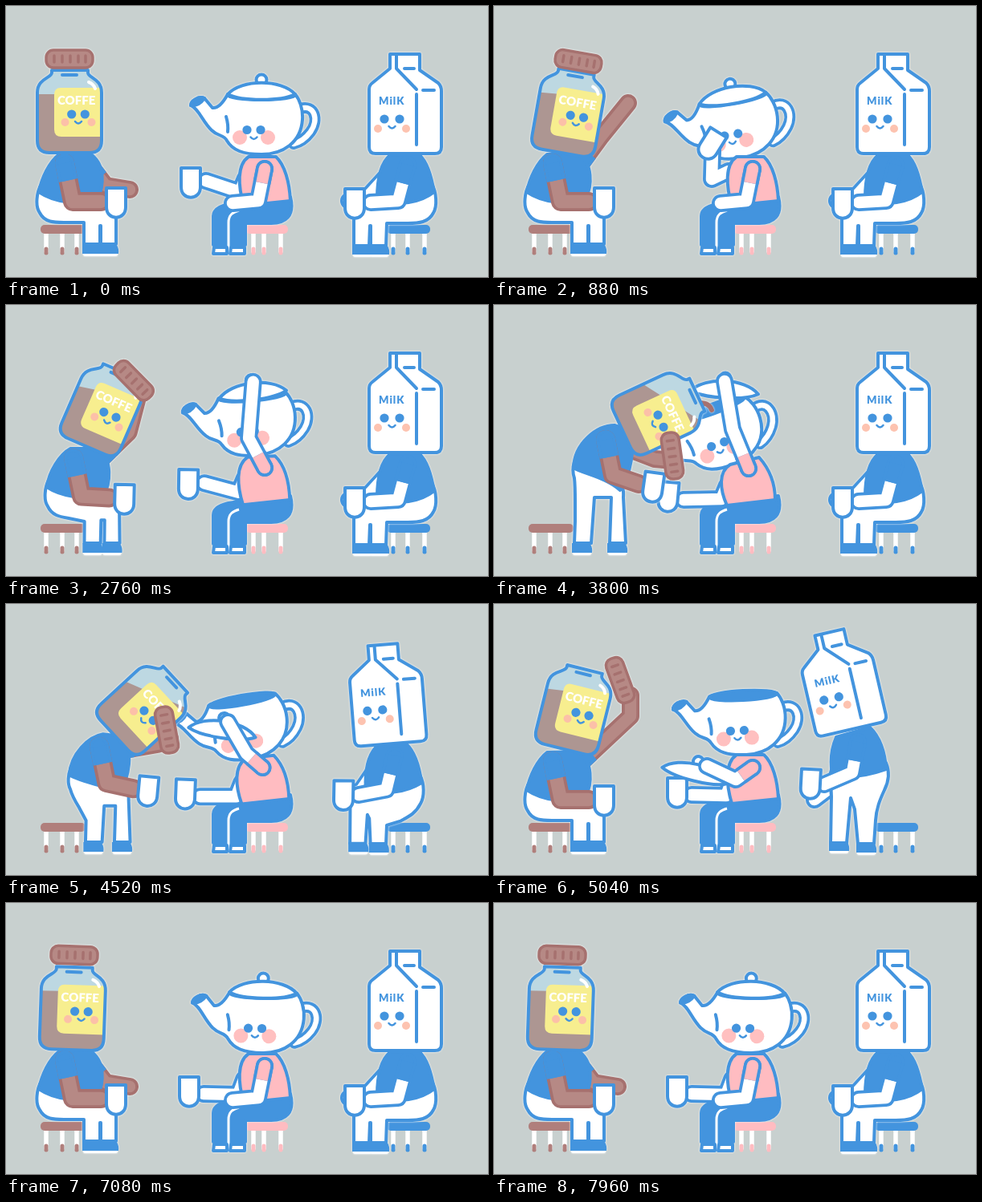
Animation, 600 px wide and 338 px high, one loop 8000 ms. Source, as an HTML page:

```html
<!DOCTYPE html>
<html lang="en">
<head>
<meta charset="utf-8">
<title>Coffee, tea and milk</title>
<style>
  html, body { margin: 0; width: 100%; height: 100%; overflow: hidden; background: #c8d0cf; }
  svg { display: block; width: 100vw; height: 100vh; }
  .friend { filter: drop-shadow(0 0 .8px #fff); }
  .line { stroke: #4394de; stroke-width: 4; stroke-linecap: round; stroke-linejoin: round; }
  .white { fill: #fff; }
  .blue { fill: #4394de; }
  .none { fill: none; }
  .pink { fill: #ffbcc1; }
  .brown { fill: #b68985; stroke: #a6716f; stroke-width: 3.5; stroke-linecap: round; }
  text { font: 900 15px Lato, "Open Sans", sans-serif; }
</style>
</head>
<body>
<svg viewBox="0 0 600 338">
  <defs>
    <path id="cup" class="line white" d="M-12 -18 H12 V6 C12 23 -12 23 -12 6 Z"/>
    <g id="shoe">
      <rect x="-11" y="9" width="23" height="5" rx="2.5" fill="#fff"/>
      <path class="blue" d="M-12 -1 H10 Q14 4 13 11 H-12 Z"/>
    </g>
    <path id="jarShape" d="M57 80 V83 C57 90 39 90 39 108 V168 Q39 183 54 183 H104 Q119 183 119 168 V108 C119 90 102 90 102 83 V80 Z"/>
    <clipPath id="jarClip"><use href="#jarShape"/></clipPath>
  </defs>
  <g id="stools"></g>

  <g class="friend" id="tea">
    <path class="line blue" d="M354 238 C360 262 348 271 330 271 L298 271 V298 H258 V262 C258 248 280 246 300 244 Z"/>
    <path class="none" stroke="#fff" stroke-width="3" d="M277 301 V270 C277 260 283 257 290 255"/>
    <path class="line white" stroke-width="3" d="M259 301 H275 V309 H258 Z M280 301 H297 V309 H279 Z"/>
    <g id="pot">
      <g fill="none" stroke-linecap="round">
        <path id="handle" stroke="#4394de" stroke-width="14" d="M366 128 C384 122 390 142 379 157 C373 165 366 170 358 172"/>
        <path stroke="#fff" stroke-width="6.5" d="M366 128 C384 122 390 142 379 157 C373 165 366 170 358 172"/>
      </g>
      <path class="line white" d="M276 110 C270 121 264 128 257 127 L247 115 C240 112 230 118 230 124 C240 128 245 145 256 155 C264 163 271 160 275 168 C282 180 295 185 318 185 C345 185 367 170 369 142 C370 128 365 116 360 110 C340 105 296 105 276 110 Z"/>
      <path class="line blue" d="M247 115 C240 112 230 118 230 124 Q240 125 247 115 Z"/>
      <path class="line none" d="M274 138 Q277 148 276 157"/>
      <ellipse class="line blue" cx="318" cy="111" rx="42" ry="6"/>
      <g id="teaFace"></g>
    </g>
    <g id="teaFar"></g>
    <use id="teaCup" href="#cup"/>
    <path id="teaShirt" class="line pink"/>
    <g id="teaLid">
      <circle class="line white" cy="-18" r="6.5"/>
      <path class="line white" d="M-42 0 C-25 -19 25 -19 42 0 C25 9 -25 9 -42 0 Z"/>
    </g>
    <g id="teaNear"></g>
  </g>

  <g class="friend" id="milk">
    <g id="milkFar"></g>
    <path id="milkPants" class="line white"/>
    <use id="milkShoeA" href="#shoe"/><use id="milkShoeB" href="#shoe"/>
    <path id="milkShirt" class="line blue"/>
    <path id="milkStream" fill="none" stroke="#fff" stroke-width="6" stroke-linecap="round" d="M320 92 Q313 98 313 114"/>
    <g id="carton">
      <path class="line white" d="M478 60 H515 V80 L538 96 Q542 100 542 106 V176 Q542 184 534 184 H460 Q452 184 452 176 V104 Q452 99 456 96 L478 78 Z"/>
      <path class="line none" d="M486 62 V78 L511 104 M511 110 V173 M496 78 H508 M519 105 H533"/>
      <text class="blue" x="464" y="123" style="font-size:13px" letter-spacing="1">MilK</text>
      <g id="milkFace"></g>
    </g>
    <g id="milkNear"></g>
    <use id="milkCup" href="#cup"/>
  </g>

  <g class="friend" id="coffee">
    <g id="coffeeFar"></g>
    <path id="coffeePants" class="line white"/>
    <use id="coffeeShoeA" href="#shoe"/><use id="coffeeShoeB" href="#shoe"/>
    <path id="coffeeShirt" class="line blue"/>
    <g id="coffeeNear"></g>
    <path id="coffeeStream" fill="none" stroke="#a6716f" stroke-width="6" stroke-linecap="round" d="M256 122 Q268 122 271 131"/>
    <g id="jar">
      <use href="#jarShape" fill="#bdd8e2"/>
      <g clip-path="url(#jarClip)">
        <rect id="liquid" x="-40" y="110" width="240" height="200" fill="#ad9692"/>
        <path fill="#f7ee8f" d="M120 102 H68 Q60 102 60 111 V154 Q60 163 69 163 H120 Z"/>
      </g>
      <use href="#jarShape" class="line none"/>
      <path class="line none" d="M70 86 H88"/>
      <path d="M103 95 Q109 97 111 103" fill="none" stroke="#fff" stroke-width="4" stroke-linecap="round"/>
      <text x="64" y="123" fill="#fff">COFFE</text>
      <g id="coffeeFace"></g>
    </g>
    <use id="coffeeCup" href="#cup"/>
    <g id="coffeeLid" class="brown">
      <rect x="-29" y="-11" width="58" height="22" rx="9"/>
      <path d="M-19 -4 V4 M-9 -4 V4 M1 -4 V4 M11 -4 V4 M20 -4 V4"/>
    </g>
  </g>
</svg>
<script>
const LOOP = 8000, BLUE = '#4394de', PINK = '#ffbcc1', BROWN = '#b68985';
const NUMBER = /-?\d*\.?\d+/g;
const $ = id => document.getElementById(id);
const tracks = [];

function add(parent, tag, attrs) {
  const el = document.createElementNS('http://www.w3.org/2000/svg', tag);
  for (const name in attrs) el.setAttribute(name, attrs[name]);
  return parent.appendChild(el);
}

// keys maps a time to a string; the numbers inside are eased between keys.
function drive(apply, keys) {
  tracks.push({ apply, steps: Object.entries(keys).map(([t, s]) => [+t, s, s.match(NUMBER).map(Number)]) });
}
const track = (id, attr, keys) => drive(s => $(id).setAttribute(attr, s), keys);

// Two-bone limb given as shoulder, elbow, hand.
function limb(id, { skin = '#fff', edge = BLUE, sleeve = BLUE, len = 0, w = 22 }, keys) {
  const layer = (stroke, width, dashed) => add($(id), 'path', {
    fill: 'none', stroke, 'stroke-width': width, 'stroke-linejoin': 'round',
    ...(dashed ? { 'stroke-dasharray': `${len} 999` } : { 'stroke-linecap': 'round' })
  });
  const inner = w - 7.5;
  const full = [layer(edge, w), layer(skin, inner)], caps = [];
  if (len) for (const [color, width] of [[BLUE, w], [sleeve, inner]]) {
    caps.push(layer(color, width));
    full.push(layer(color, width, true));
  }
  drive(s => {
    const [x, y] = s.split(' ');
    full.forEach(p => p.setAttribute('d', 'M' + s));
    caps.forEach(p => p.setAttribute('d', `M${x} ${y} h.01`));
  }, keys);
}

function face(id, x, y, eyeGap, cheekGap, cheekY, cheekR, cheek) {
  for (const side of [-1, 1]) {
    add($(id), 'circle', { cx: x + side * cheekGap, cy: cheekY, r: cheekR, fill: cheek });
    add($(id), 'circle', { cx: x + side * eyeGap, cy: y, r: 5.6, fill: BLUE });
  }
  add($(id), 'path', { d: `M${x - 4} ${y + 9} q4 5 8 0`, class: 'line none', style: 'stroke-width:2.5' });
}

function stool(x, width, color, legs) {
  for (const leg of legs) {
    add($('stools'), 'path', { d: `M${leg} 282 V306`, stroke: '#fff', 'stroke-width': 5.5, 'stroke-linecap': 'round' });
    add($('stools'), 'path', { d: `M${leg} 303 V308`, stroke: color, 'stroke-width': 5, 'stroke-linecap': 'round' });
  }
  add($('stools'), 'rect', { x, y: 273, width, height: 11, rx: 5, fill: color });
}

stool(43, 56, '#b07f7c', [50, 70, 88]);
stool(298, 53, PINK, [308, 321, 342]);
stool(474, 54, BLUE, [482, 500, 521]);
face('coffeeFace', 90, 135, 8.3, 16.5, 145, 5, '#fcc0a8');
face('teaFace', 308.5, 154.5, 8.5, 17.5, 164, 9, '#ffc0c0');
face('milkFace', 480.5, 141, 9.5, 17.5, 153, 5, '#fdc3b0');

// Coffee jar: opens up, stands to pour, sits and closes again.
const stand = (seated, standing) => ({ 0: seated, 2560: seated, 3250: standing, 4250: standing, 4900: seated, 8000: seated });
track('coffeePants', 'd', stand(
  'M44 222 C38 232 36 250 42 258 C48 270 60 270 72 270 L97 270 L97 297 L117 297 L117 274 L118 274 L118 297 L137 297 L137 252 C137 240 125 236 112 236 Z',
  'M100 196 C98 202 98 210 100 216 C101 225 101 235 101 245 L101 270 L100 297 L121 297 L125 240 L146 240 L144 297 L164 297 L161 240 C162 225 158 222 150 215 Z'));
track('coffeeShirt', 'd', stand(
  'M66 185 C54 194 44 215 41 232 C60 245 95 250 114 240 C122 225 124 196 104 184 Z',
  'M150 150 C128 150 100 172 99 203 C110 210 140 215 157 231 C168 215 180 175 165 155 Z'));
track('coffeeShoeA', 'transform', stand('translate(107 298)', 'translate(109 298)'));
track('coffeeShoeB', 'transform', stand('translate(127 298)', 'translate(153 298)'));
track('coffeeCup', 'transform', stand('translate(137 245) rotate(0)', 'translate(198 227) rotate(8)'));
limb('coffeeNear', { skin: BROWN, edge: '#a6716f', len: 22, w: 24 },
  stand('73 196 83 244 118 244', '139 168 148 212 180 223'));
limb('coffeeFar', { skin: BROWN, edge: '#a6716f', len: 20 }, {
  0: '104 198 124 224 154 229', 300: '104 198 124 224 154 229', 880: '106 200 133 163 167 121',
  1200: '106 200 148 150 138 82', 1600: '106 200 148 150 136 78', 2080: '106 200 143 152 155 88',
  2560: '106 200 143 152 155 88', 3250: '156 175 200 192 222 194', 4250: '156 175 200 192 222 194',
  4900: '106 200 170 142 170 118', 5040: '106 200 170 140 170 114', 5500: '106 200 160 150 138 82',
  6000: '106 200 160 150 138 82', 6360: '106 200 151 160 156 115', 6950: '104 198 124 224 154 229',
  8000: '104 198 124 224 154 229'
});
const jarKeys = {
  0: [0, 0, 0], 300: [0, 0, 0], 880: [4, 0, 10], 1300: [7, -1, 14], 2080: [7, -2, 15], 2560: [7, -2, 15],
  3250: [74, -32, 65], 4250: [74, -32, 65], 4900: [7, -2, 14], 5040: [7, -2, 14], 5500: [7, 0, 15],
  6360: [7, 1, 15], 7000: [2, 0, 2], 8000: [2, 0, 2]
};
const mapKeys = (keys, fn) => Object.fromEntries(Object.entries(keys).map(([t, v]) => [t, fn(...v)]));
track('jar', 'transform', mapKeys(jarKeys, (x, y, r) => `translate(${x} ${y}) rotate(${r} 79 190)`));
track('liquid', 'transform', mapKeys(jarKeys, (x, y, r) => `rotate(${-r / 2} 79 110)`));
const place = (x, y, r) => `translate(${x} ${y}) rotate(${r})`;
track('coffeeLid', 'transform', mapKeys({
  0: [79, 66, 0], 300: [79, 66, 0], 880: [105, 69, 10], 1300: [115, 70, 14], 1600: [117, 66, 16],
  2080: [146, 75, 38], 2560: [146, 75, 38], 3250: [222, 188, 82], 4250: [222, 188, 82],
  4900: [159, 99, 75], 5040: [157, 95, 70], 5500: [120, 72, 15], 6360: [122, 73, 14],
  7000: [85, 65, 2], 8000: [85, 65, 2]
}, place));
track('coffeeStream', 'opacity', { 0: '0', 3300: '0', 3450: '1', 4100: '1', 4230: '0', 8000: '0' });

// Teapot: sips, lifts its lid, keeps it on its lap, puts it back.
track('pot', 'transform', mapKeys({
  0: [0, 0, 0], 200: [0, 0, 0], 700: [-8, 4, -10], 1150: [-8, 4, -10], 1750: [-2, 0, -2], 2560: [-2, 0, -2],
  3250: [-20, 14, -20], 4200: [-20, 14, -20], 4800: [-4, 3, -3], 5150: [-4, 3, -3], 5400: [0, 3, 5],
  5750: [0, 3, 5], 6100: [-3, 4, -4], 6400: [-3, 4, -4], 7000: [1, 2, 1], 8000: [1, 2, 1]
}, (x, y, r) => `translate(${x} ${y}) rotate(${r} 318 185)`));
track('teaLid', 'transform', mapKeys({
  0: [318, 110, 0], 200: [318, 110, 0], 700: [297, 115, -10], 1150: [297, 115, -10], 1750: [313, 110, -2],
  2560: [313, 110, -2], 2850: [306, 112, -8], 3250: [287, 109, 3], 4200: [287, 109, 3], 4850: [250, 214, 14],
  5750: [250, 214, 14], 6150: [310, 114, -4], 6400: [310, 114, -4], 7000: [320, 112, 1], 8000: [320, 112, 1]
}, place));
limb('teaNear', { sleeve: PINK, len: 18 }, {
  0: '322 203 314 243 282 246', 2300: '322 203 314 243 282 246', 2800: '322 203 302 165 308 94',
  3250: '317 204 297 155 287 95', 4200: '317 204 297 155 287 95', 4850: '322 204 301 219 265 202',
  5750: '322 204 301 219 265 202', 6150: '324 203 300 197 300 98', 6360: '324 203 296 196 272 150',
  6900: '322 203 314 243 282 246', 8000: '322 203 314 243 282 246'
});
limb('teaFar', {}, {
  0: '298 215 291 232 249 218', 200: '298 215 291 232 249 218', 700: '292 206 271 216 272 180',
  1150: '292 206 271 216 272 180', 1700: '298 215 291 232 249 218', 2560: '298 215 291 232 249 218',
  3250: '290 225 283 242 236 243', 4200: '290 225 283 242 236 243', 4800: '296 220 289 239 246 238',
  8000: '296 220 289 239 246 238'
});
track('teaCup', 'transform', mapKeys({
  0: [230, 220, 0], 200: [230, 220, 0], 700: [270, 173, 32], 1150: [270, 173, 32], 1700: [229, 220, 0],
  2560: [229, 220, 0], 3250: [217, 239, 5], 4200: [217, 239, 5], 4800: [228, 235, 0], 8000: [228, 235, 0]
}, place));
const teaSits = 'M302 188 C287 198 289 225 296 249 L354 243 C353 220 347 198 336 188 Z';
const teaLeans = 'M294 199 C279 208 281 230 290 250 L350 243 C350 226 346 208 330 190 Z';
track('teaShirt', 'd', { 0: teaSits, 2560: teaSits, 3250: teaLeans, 4200: teaLeans, 4800: teaSits, 8000: teaSits });

// Milk carton: stands, pours, sits down.
const rise = (seated, standing, pouring = standing) => ({
  0: seated, 4250: seated, 4900: standing, 5060: standing, 5350: pouring, 5700: pouring, 6000: standing, 6400: seated, 8000: seated
});
track('milkPants', 'd', rise(
  'M530 222 C536 232 537 250 532 258 C526 270 514 271 500 271 L474 271 L473 299 L454 299 L454 274 L453 274 L452 299 L433 299 L433 256 C433 244 445 238 460 238 Z',
  'M488 198 C493 210 491 222 486 232 C480 245 476 255 475 270 L474 285 L473 299 L453 299 L449 256 L444 242 L439 298 L419 298 L420 240 C418 225 422 215 426 206 Z'));
track('milkShirt', 'd', rise(
  'M478 186 C466 196 462 215 462 240 C490 250 515 246 533 232 C529 210 524 194 514 185 Z',
  'M426 166 C420 180 418 195 421 212 C440 218 465 214 488 206 C487 185 480 165 468 154 Z',
  'M414 152 C408 175 412 195 421 212 C440 218 465 214 488 206 C486 175 472 150 446 140 Z'));
track('milkShoeA', 'transform', rise('translate(443 299)', 'translate(429 297)'));
track('milkShoeB', 'transform', rise('translate(464 299)', 'translate(463 299)'));
track('milkCup', 'transform', rise('translate(434 246) rotate(0)', 'translate(394 224) rotate(3)', 'translate(380 222) rotate(-4)'));
limb('milkNear', { len: 24 }, rise('500 198 488 243 454 245', '453 172 446 210 411 225', '440 165 434 208 396 225'));
limb('milkFar', {}, rise('474 212 452 236 427 243', '432 198 424 225 399 244', '420 190 410 222 385 240'));
track('carton', 'transform', rise(
  'translate(0 0) rotate(0 497 185)', 'translate(-51 -28) rotate(-13 497 185)', 'translate(-68 -46) rotate(-62 497 185)'));
track('milkStream', 'opacity', { 0: '0', 5300: '0', 5380: '1', 5650: '1', 5730: '0', 8000: '0' });

const ease = p => p < .5 ? 2 * p * p : 1 - 2 * (1 - p) ** 2;

function draw(time) {
  for (const { apply, steps } of tracks) {
    const i = Math.max(1, steps.findIndex(step => step[0] > time));
    const [t0, text, from] = steps[i - 1], [t1, , to] = steps[i];
    const p = ease((time - t0) / (t1 - t0));
    let n = 0;
    apply(text.replace(NUMBER, () => (from[n] + (to[n++] - from[n - 1]) * p).toFixed(2)));
  }
}

const start = performance.now();
function frame() {
  draw((performance.now() - start) % LOOP);
  requestAnimationFrame(frame);
}
frame();
</script>
</body>
</html>
```
